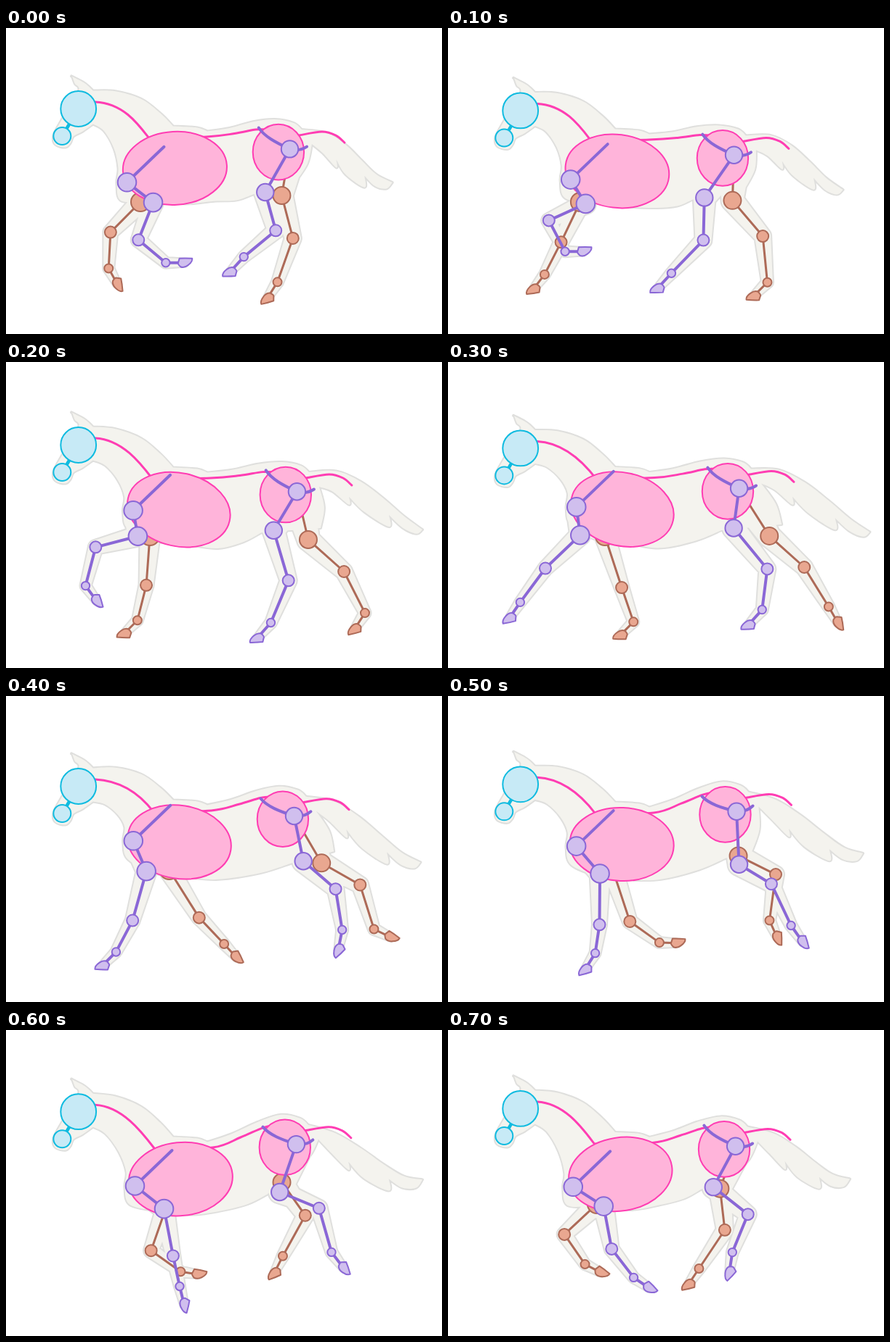
These frames come from a looping animation (600x422 px, 0.8 s). An HTML page:

```html
<!DOCTYPE html>
<html lang="en">
<head>
<meta charset="utf-8">
<title>Horse canter cycle</title>
<style>
html, body { margin: 0; width: 100%; height: 100%; overflow: hidden; background: #fff; }
svg { display: block; width: 100%; height: 100%; }
</style>
</head>
<body>
<svg id="stage" viewBox="0 0 600 422" stroke-linecap="round" stroke-linejoin="round"></svg>
<script>
const STEP = 100, POSES = 8;
const PURPLE = { line: '#8a67d6', fill: '#d0bfee', width: 4 };
const BROWN = { line: '#ad6a57', fill: '#e9a790', width: 3 };
const PINK = { line: '#ff3db3', fill: '#ffb4da' };
const CYAN = { line: '#0fbbe0', fill: '#c7eaf6' };
const COAT = { line: '#dfdfdd', fill: '#f4f3ee' };

// Each motion is a wave: mean, cos, sin, then cos and sin at double speed
const trunk = {
  headY: [115.8, -6.5, 0.9, 2.2, 2.1],
  ribsX: [237.3, -3.1, -1.3, -1.8, -1.3], ribsY: [201, -4, -1, -3.6], ribsTilt: [3.1, -6.1, 9.3, -0.3, 1.5],
  hipX: [396.7, -3, 0.5, -3.2, -1.4], hipY: [167.2, 0.7, 10.6, -1], hipTilt: [-3, 3.5, 3.5, 0, -2.5],
  shoulderX: [173.6, -4.4, -1.2, -2.7, -0.9], shoulderY: [208.1, 6.5, -5.1, -1.8],
  farElbowX: [207.4, -19.8, -12, -2.6, -3],
  tailX: [562, -19.4, 0, -11, -4.7], tailY: [220, -8.1, 12.4, 1.2], tailDroop: [4, 0, -14]
};

// Bones from top to bottom: forward swing in degrees, and length
const legs = {
  nearFore: [
    { swing: [-34.3, -14.6, 20.8, -3.4, -1.9], length: [44.5, 0, -7.5, 1] },
    { swing: [25.4, 2.9, 43.1, -6.9, 7.6], length: [63, -7.5, -3] },
    { swing: [-5, -38.9, 13.4, -6.2, -4.5], length: [49, 0, 6, 0, -5] },
    { swing: [-19.9, -75, -11.2, 5, -9.2], length: [26] }
  ],
  farFore: [
    { swing: [9, 38.4, -7.5, -2.7, -5.4], length: [68, -9.5] },
    { swing: [-20.2, 23.2, 34.3, 0, 6.5], length: [50] },
    { swing: [-17.2, 6.7, 82.5, -18.4, -8.3], length: [25] }
  ],
  nearHind: [
    { swing: [17, 20.5, 6, -8, -1], length: [66, 2.5, -3.7, 0, 6.3] },
    { swing: [-37.1, 16.9, 25.6, 4.9, 8.4], length: [61, -2, 6.8, -4.3, -5.7] },
    { swing: [12, 29.8, 19.2, 8.6, -2.7], length: [60, 0, 0, -3, 3.4] },
    { swing: [14.5, 15.7, 39.3, 12.3, -10.8], length: [28] }
  ],
  farHind: [
    { swing: [-3.2, 20, -17, -7, 3], length: [66, -5, 6, 4, -4] },
    { swing: [-39.6, 22.9, -6.5, 2.1, -12.3], length: [61, 0, 5] },
    { swing: [1, 18.4, -27.8], length: [64] },
    { swing: [7, 48, 3, -23, 5], length: [26] }
  ]
};
const FLAT = 41, MAX_PASTERN = 45;

const wave = ([mean, c1 = 0, s1 = 0, c2 = 0, s2 = 0], a) =>
  mean + c1 * Math.cos(a) + s1 * Math.sin(a) + c2 * Math.cos(2 * a) + s2 * Math.sin(2 * a);
const by = ([x, y], dx, dy) => [x + dx, y + dy];
const mix = (p, q, k, dx = 0, dy = 0) => [p[0] + (q[0] - p[0]) * k + dx, p[1] + (q[1] - p[1]) * k + dy];

function bezier(a, b, c, d, k) {
  const ab = mix(a, b, k), bc = mix(b, c, k), cd = mix(c, d, k);
  return mix(mix(ab, bc, k), mix(bc, cd, k), k);
}

// Walks down the bones; a hoof on the ground stays flat
function limb(root, bones, phase) {
  const joints = [root];
  let swing;
  bones.forEach((bone, i) => {
    swing = wave(bone.swing, phase);
    if (i === bones.length - 1) swing = Math.min(swing, MAX_PASTERN);
    const a = swing * Math.PI / 180, size = wave(bone.length, phase);
    joints.push(by(joints[i], -Math.sin(a) * size, Math.cos(a) * size));
  });
  return { joints, hoof: 1.35 * (swing - FLAT) };
}

function pose(phase) {
  const v = {};
  for (const key in trunk) v[key] = wave(trunk[key], phase);
  const hip = [v.hipX, v.hipY], shoulder = [v.shoulderX, v.shoulderY];
  return {
    hip, shoulder, hipTilt: v.hipTilt, ribsTilt: v.ribsTilt, droop: v.tailDroop,
    head: [99.7, v.headY], ribs: [v.ribsX, v.ribsY], pelvis: by(hip, -15.6, 4.2), tail: [v.tailX, v.tailY],
    nearFore: limb(shoulder, legs.nearFore, phase), farFore: limb([v.farElbowX, 240], legs.farFore, phase),
    nearHind: limb(hip, legs.nearHind, phase), farHind: limb(hip, legs.farHind, phase)
  };
}

// Catmull-Rom curve that continues from the first point
function curve(list) {
  let d = '';
  for (let i = 0; i < list.length - 1; i++) {
    const a = list[i], b = list[i + 1], before = list[i - 1] || a, after = list[i + 2] || b;
    d += `C${by(a, (b[0] - before[0]) / 6, (b[1] - before[1]) / 6)} ${by(b, (a[0] - after[0]) / 6, (a[1] - after[1]) / 6)} ${b}`;
  }
  return d;
}

// Smooth runs of points that meet at corners
function outline(runs) {
  let last = runs[0][0], d = `M${last}`;
  for (const run of runs) {
    d += curve([last, ...run]);
    last = run[run.length - 1];
  }
  return d + 'Z';
}

function headRuns({ head }) {
  const h = (x, y) => by(head, x, y);
  return {
    ear: [h(-8.5, -44.5), h(6, -37), h(14, -31), h(20, -25)],
    face: [h(20, 21), h(6, 31), h(-7, 38), h(-11, 47), h(-18, 53), h(-32, 49), h(-34, 36), h(-23, 15)],
    brow: [h(0, -24), h(-5, -35), h(-8.5, -44.5)]
  };
}

function topRuns({ head, ribs, pelvis }) {
  const poll = by(head, 20, -25), withers = [230, ribs[1] - 58];
  const dip = [277, ribs[1] - 51], croup = by(pelvis, -5, -45);
  return [
    [mix(poll, withers, 0.28, 0, -13), mix(poll, withers, 0.6, 0, -18), mix(poll, withers, 0.84, 0, -10), withers],
    [by(dip, -14, -5), dip],
    [mix(dip, croup, 0.33, 0, 1), mix(dip, croup, 0.68, 0, -2), croup, by(pelvis, 21, -40), by(pelvis, 32, -31)]
  ];
}

function tailRuns({ pelvis, tail, droop }) {
  const dock = by(pelvis, 32, -31);
  const along = (k, dx = 0, dy = 0) =>
    by(bezier(dock, by(dock, 65, droop - 10), by(tail, -40, droop - 12), tail, k), dx, dy);
  const notch = along(0.68, -4, 13), tuft = along(0.32, -3, 28);
  return [
    [0.2, 0.4, 0.6, 0.8, 1].map(k => along(k)),
    [along(0.93, 0, 11), along(0.8, -2, 16), notch],
    [by(notch, 0, 16), along(0.5, -11, 31), tuft],
    [by(tuft, 0, 11), along(0.2, -5, 28), by(pelvis, 46, -11)]
  ];
}

function underRuns({ head, ribs, ribsTilt, pelvis, shoulder, nearHind, farHind }) {
  const stifles = [nearHind.joints[1], farHind.joints[1]].sort((a, b) => a[0] - b[0]);
  const flank = by(stifles[0], -17, 3), buttock = by(stifles[1], 17, -16), rump = by(pelvis, 46, -11);
  const belly = by(ribs, 54, 47 + ribsTilt / 2), throat = by(head, 20, 21), breast = by(shoulder, -12, -19);
  return [
    [mix(rump, buttock, 0.5, 6), buttock],
    [flank],
    [mix(flank, belly, 0.42, 0, 4), belly, by(ribs, 15, 49), by(ribs, -30, 44), by(shoulder, -7, 26),
      by(shoulder, -14, 2), breast, mix(breast, throat, 0.4, 8, -3), mix(breast, throat, 0.8, 8, -3), throat]
  ];
}

// Outline of one limb segment between two round joints
function taper(a, b, ra, rb) {
  const dx = b[0] - a[0], dy = b[1] - a[1], len = Math.hypot(dx, dy) || 1;
  const edge = (p, r) => by(p, dy / len * r, -dx / len * r);
  return `M${edge(a, ra)}L${edge(b, rb)}A${rb},${rb} 0 0 1 ${edge(b, -rb)}L${edge(a, -ra)}A${ra},${ra} 0 0 1 ${edge(a, ra)}Z`;
}

const flesh = ({ joints }, radii) =>
  joints.slice(1).map((p, i) => taper(joints[i], p, radii[i], radii[i + 1])).join('');

function silhouette(p) {
  const { ear, face, brow } = headRuns(p);
  const fore = [14, 13.5, 9.5, 7, 5], hind = [24, 15, 11, 7.5, 5];
  const d = outline([ear, ...topRuns(p), ...tailRuns(p), ...underRuns(p), face, brow]) +
    flesh(p.nearFore, fore) + flesh(p.farFore, fore.slice(1)) + flesh(p.nearHind, hind) + flesh(p.farHind, hind);
  return stroke(d, COAT.line, 4) + `<path d="${d}" fill="${COAT.fill}"/>`;
}

function spine({ head, ribs, pelvis }) {
  const poll = by(head, 23, -9.5), withers = by(ribs, -36, -42);
  const loin = by(ribs, 44, -43.5), croup = by(pelvis, -14, -31);
  return `M${poll}C${by(poll, 38, 2)} ${by(withers, -16, -21)} ${withers}` +
    curve([withers, loin, mix(loin, croup, 0.45), mix(loin, croup, 0.8, 0, -2), croup]) +
    `M${by(pelvis, 28, -23)}` +
    curve([by(pelvis, 28, -23), by(pelvis, 60, -28), by(pelvis, 79, -23), by(pelvis, 91, -13)]);
}

const stroke = (d, color, width) =>
  `<path d="${d}" fill="none" stroke="${color}" stroke-width="${width}"/>`;
const oval = ([x, y], rx, ry, { line, fill }, tilt = 0) =>
  `<ellipse rx="${rx}" ry="${ry}" transform="translate(${x} ${y}) rotate(${tilt})" fill="${fill}" stroke="${line}" stroke-width="2"/>`;
const circle = (p, r, ink) => oval(p, r, r, ink);

function leg({ joints, hoof }, radii, ink) {
  const [x, y] = joints[joints.length - 1];
  return stroke('M' + joints.join('L'), ink.line, ink.width) +
    `<path d="M-10,6.5Q-11,2 -5,-3Q0,-7.5 5,-6Q9,-3 9,-1L7.5,5.5Q0,6.5 -10,6.5Z" transform="translate(${x} ${y}) rotate(${hoof})" fill="${ink.fill}" stroke="${ink.line}" stroke-width="2"/>` +
    radii.map((r, i) => r ? circle(joints[i], r, ink) : '').join('');
}

function draw(p) {
  const muzzle = by(p.head, -22.4, 37.5);
  const hipBone = 'M-43,-29C-35,-17 -20,-9 0,0C8,2 17,1 23.5,-3.5';
  return silhouette(p) +
    leg(p.farFore, [13, 8, 6], BROWN) +
    leg(p.farHind, [0, 12, 8, 6], BROWN) +
    stroke(spine(p), PINK.line, 3) +
    oval(p.ribs, 71.6, 50.5, PINK, p.ribsTilt) + oval(p.pelvis, 35.2, 38.3, PINK) +
    stroke(`M${p.head}L${muzzle}`, CYAN.line, 4.5) +
    circle(p.head, 24.4, CYAN) + circle(muzzle, 12, CYAN) +
    `<g transform="translate(${p.hip}) rotate(${p.hipTilt})">${stroke(hipBone, PURPLE.line, 4)}</g>` +
    leg(p.nearHind, [11.7, 11.7, 8, 5.7], PURPLE) +
    stroke(`M${by(p.shoulder, 51, -49)}L${p.shoulder}`, PURPLE.line, 4) +
    leg(p.nearFore, [12.8, 12.8, 8, 5.7], PURPLE);
}

const stage = document.getElementById('stage');
let shown = -1;

function update() {
  const index = Math.floor(performance.now() / STEP) % POSES;
  if (index !== shown) stage.innerHTML = draw(pose(index / POSES * 2 * Math.PI));
  shown = index;
  requestAnimationFrame(update);
}
update();
</script>
</body>
</html>
```
